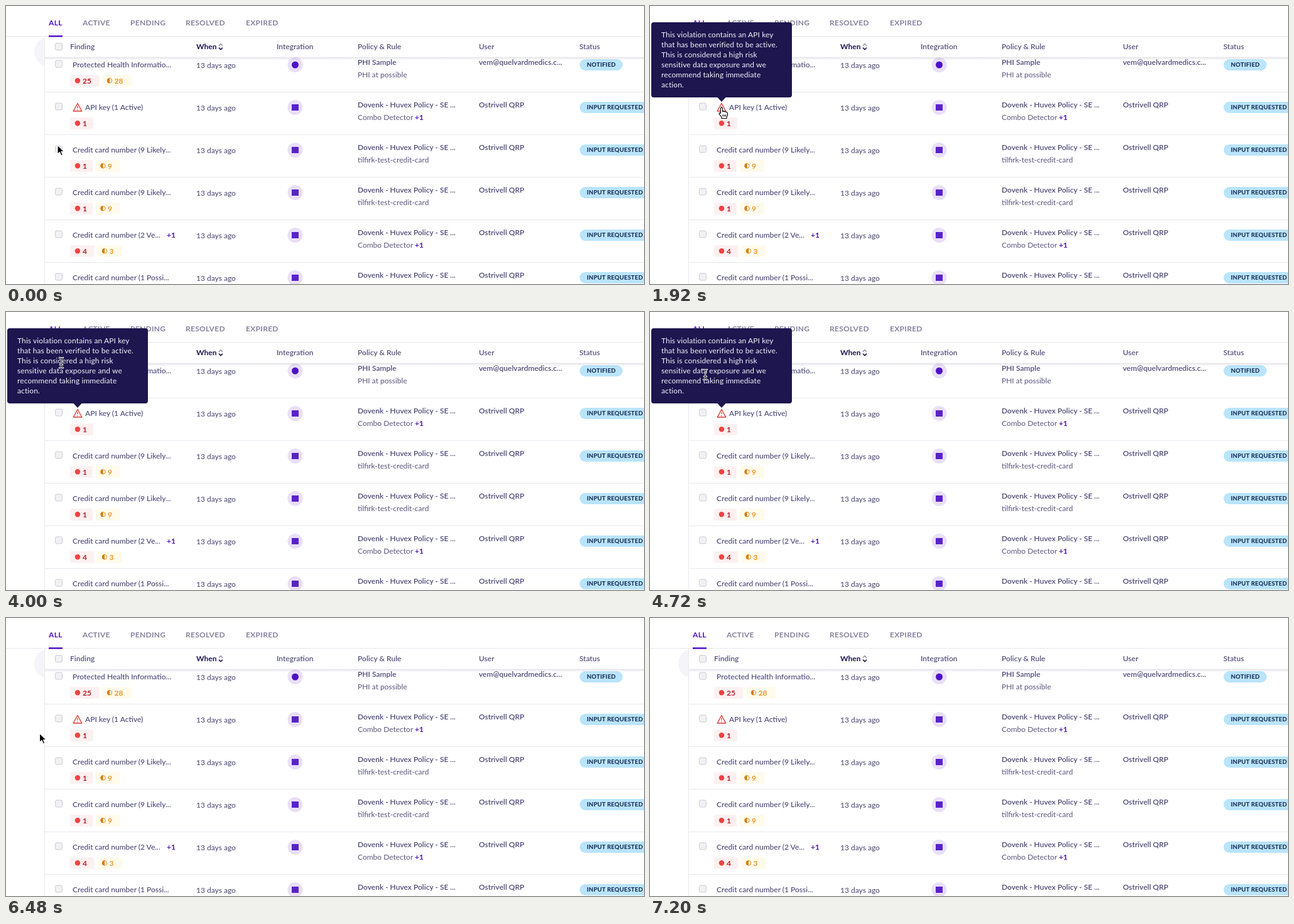
An HTML page for the animation above (7600 ms loop, 1016 by 444 pixels).

```html
<!DOCTYPE html>
<html lang="en">
<head>
<meta charset="utf-8">
<title>Findings table</title>
<style>
  html, body { margin: 0; height: 100%; overflow: hidden; background: #fff; }
  svg { display: block; width: 100%; height: 100%; }
  text { font: 500 12px Lato, "Open Sans", sans-serif; fill: #4b4776; white-space: pre; }
  .tab { font-weight: 700; letter-spacing: .3px; fill: #85829e; }
  .tab.on { fill: #5013c9; }
  .head { font-weight: 600; fill: #56527d; }
  .head.sorted { font-weight: 700; fill: #1c1650; }
  .when { fill: #55517c; }
  .bold { font-weight: 600; fill: #4e4a77; }
  .rule { font-weight: 400; fill: #5b577f; }
  .more { font-weight: 700; fill: #4c16b4; }
  .high { font-weight: 700; fill: #b8202b; }
  .mid { font-weight: 700; fill: #f0982a; }
  .status { font-size: 9.5px; font-weight: 800; letter-spacing: .2px; fill: #1c3158; }
  .tip { font-weight: 400; letter-spacing: .1px; fill: #f3f2f8; }
  .line { stroke: #e9e8ef; }
  .box { fill: #f1f1f4; stroke: #cbcad4; }
</style>
</head>
<body>
<svg id="stage" viewBox="0 0 1016 444">
  <defs>
    <linearGradient id="shade" x2="0" y2="1">
      <stop stop-color="#29264d" stop-opacity=".13"/>
      <stop offset="1" stop-color="#29264d" stop-opacity="0"/>
    </linearGradient>
  </defs>
  <g id="table"></g>
  <g id="tooltip"></g>
  <g id="cursor">
    <path id="arrow" d="M0 0V14.6L3.4 11.5 5.9 17 8.4 15.9 6 10.5H10.6Z"
      fill="#000" stroke="#fff" stroke-width="1.2" stroke-linejoin="round"/>
    <path id="hand" d="M-1.5 1.2Q0-1 1.5 1.2V6.5Q3.2 5 4.3 6.9 6 5.7 7 7.6 9.2 6.8 9.5 9.2V12
      Q9 14 8 15.4V17.5H0V15.6L-4 10.2Q-4.3 7.6-1.5 9.2ZM2 11.5V14.5M4.2 11.5V14.5M6.4 11.5V14.5"
      fill="#fff" stroke="#000" stroke-width="1.1" stroke-linejoin="round"/>
    <g id="beam" fill="none" stroke-linecap="round"></g>
  </g>
</svg>
<script>
const $ = id => document.getElementById(id);
const text = (x, y, cls, str) => `<text x="${x}" y="${y}" class="${cls}">${str}</text>`;
const rect = (x, y, w, h, r, attrs) =>
  `<rect x="${x}" y="${y}" width="${w}" height="${h}" rx="${r}" ${attrs}/>`;
const circle = (x, y, r, attrs) => `<circle cx="${x}" cy="${y}" r="${r}" ${attrs}/>`;
const path = (d, attrs) => `<path d="${d}" ${attrs}/>`;
const checkbox = y => rect(78.5, y - 5.5, 11, 11, 2.5, 'class="box"');

const ROW_HEIGHT = 68;
const chat = { policy: "Dovenk - Huvex Policy - SE ...", user: "Ostrivell QRP", status: "INPUT REQUESTED" };
const combo = { ...chat, rule: "Combo Detector", more: true };
const card = { ...chat, name: "Credit card number (9 Likely...", rule: "tilfirk-test-credit-card", high: [1, 36], mid: [9, 38.5] };
const rows = [
  { name: "Protected Health Informatio...", policy: "PHI Sample", rule: "PHI at possible",
    user: "vem@quelvardmedics.c...", status: "NOTIFIED", high: [25, 46.5], mid: [28, 46], round: true },
  { ...combo, name: "API key (1 Active)", high: [1, 37], alert: true },
  card,
  card,
  { ...combo, name: "Credit card number (2 Ve...", extra: true, high: [4, 38.5], mid: [3, 39] },
  { ...chat, name: "Credit card number (1 Possi...", rule: "" },
];

function badges({ high, mid }, y) {
  if (!high) return "";
  let out = rect(102, y - 9, high[1], 18.5, 2, 'fill="#fdf0f0"')
    + circle(114, y, 4.2, 'fill="#ee4343"') + text(122, y + 4.3, "high", high[0]);
  if (mid) {
    const x = 102 + high[1] + 5;
    out += rect(x, y - 9, mid[1], 18.5, 2, 'fill="#fffaea"')
      + circle(x + 11.5, y, 3.7, 'fill="none" stroke="#e28a1c" stroke-width="1"')
      + path(`M${x + 11.5} ${y - 4}a4 4 0 0 0 0 8z`, 'fill="#d97b0c"')
      + text(x + 19, y + 4.3, "mid", mid[0]);
  }
  return out;
}

const alertIcon = y =>
  path(`M114 ${y - 6.5}L120.8 ${y + 6}H107.2Z`,
    'fill="#fff" stroke="#dc3f38" stroke-width="1.4" stroke-linejoin="round"')
  + path(`M114 ${y - 2}v3.6m0 1.7v1.3`, 'stroke="#dc3f38" stroke-width="1.3"');

function drawRow(row, i) {
  const y = 94 + ROW_HEIGHT * i;
  return checkbox(y - 1.5)
    + (row.alert ? alertIcon(y) : "")
    + text(row.alert ? 126 : 106, y + 4, "", row.name)
    + (row.extra ? text(256, y + 4, "more", "+1") : "")
    + badges(row, y + 25.3)
    + text(303, y + 5, "when", "13 days ago")
    + circle(460.5, y, 12, 'fill="#e9dff8"')
    + (row.round ? circle(460.5, y, 5.5, 'fill="#4d12c6"') : rect(455, y - 5, 11, 10, 0, 'fill="#5822c9"'))
    + text(560, y, "bold", row.policy)
    + text(560, y + 20, "rule", row.rule)
    + (row.more ? text(651, y + 20, "more", "+1") : "")
    + text(753, y, "bold", row.user)
    + rect(913.5, y - 9, row.round ? 68.5 : 113, 18, 9, 'fill="#b9e4fb"')
    + text(925, y + 3.4, "status", row.status)
    + path(`M62 ${y + 43.5}H1016`, 'class="line"');
}

function drawTable() {
  const tabs = [["ALL", 68], ["ACTIVE", 122], ["PENDING", 198], ["RESOLVED", 286], ["EXPIRED", 382]];
  const heads = [["Finding", 102], ["When", 303], ["Integration", 431], ["Policy &amp; Rule", 560], ["User", 753], ["Status", 913]];
  return path("M61 51A23 23 0 0 0 61 95Z", 'fill="#f5f4f9"')
    + rows.map(drawRow).join("")
    + rect(62, 49, 954, 33, 0, 'fill="#fff"')
    + rect(62, 81.5, 954, 5, 0, 'fill="url(#shade)"')
    + path("M0 48.5H1016M61.5 49V444", 'class="line"')
    + rect(68, 47, 22, 2.5, 0, 'fill="#5013c9"')
    + tabs.map(([s, x]) => text(x, 31.3, x === 68 ? "tab on" : "tab", s)).join("")
    + checkbox(65)
    + heads.map(([s, x]) => text(x, 69, x === 303 ? "head sorted" : "head", s)).join("")
    + path("M339 63.5l3-3 3 3", 'fill="none" stroke="#8c89a5" stroke-width="1.3"')
    + path("M339 66.5l3 3 3-3", 'fill="none" stroke="#1c1650" stroke-width="1.7"');
}

function drawTooltip() {
  const lines = ["This violation contains an API key", "that has been verified to be active.",
    "This is considered a high risk", "sensitive data exposure and we", "recommend taking immediate", "action."];
  return rect(2, 26, 224, 120, 4, 'fill="#1d164f"')
    + path("M107 145.5H121L114 153Z", 'fill="#1d164f"')
    + lines.map((s, i) => text(18, 50 + 16 * i, "tip", s)).join("");
}

function drawBeam() {
  const shape = "M-3-8Q0-8 0-5.5Q0-8 3-8M0-5.5V5.5M-3 8Q0 8 0 5.5Q0 8 3 8M-2 3H2";
  return path(shape, 'stroke="#fff" stroke-width="2.6"') + path(shape, 'stroke="#222"');
}

// Pointer hot spot: [ms, x, y]
const route = [
  [320, 82, 222], [1120, 123, 167], [1200, 120, 165], [1440, 114, 162], [1920, 114, 162],
  [2240, 98, 70], [2480, 86, 42], [2800, 160, 57], [3040, 68, 68], [3280, 143, 73],
  [3520, 165, 76], [3840, 50, 78], [4240, 158, 87], [4560, 52, 94], [4720, 88, 100],
  [5040, 148, 106], [5360, 105, 100], [5760, 60, 152], [5920, 60, 152], [6480, 53.5, 184], [7120, 48, 189],
];
const LOOP = 7600, STEP = 80;
const clamp = v => v < 0 ? 0 : v > 1 ? 1 : v;

function pointerAt(t) {
  const next = route.findIndex(p => p[0] > t);
  if (next === 0) return route[0].slice(1);
  if (next < 0) return route.at(-1).slice(1);
  const [t0, x0, y0] = route[next - 1], [t1, x1, y1] = route[next];
  const k = (t - t0) / (t1 - t0), e = k * k * (3 - 2 * k);
  return [x0 + (x1 - x0) * e, y0 + (y1 - y0) * e];
}

function render(now) {
  const t = Math.floor(now % LOOP / STEP) * STEP;
  const [x, y] = pointerAt(t);
  const kind = t < 1040 || t >= 5760 ? "arrow" : y > 146 ? "hand" : "beam";
  for (const id of ["arrow", "hand", "beam"]) $(id).style.display = id === kind ? "" : "none";
  $("cursor").setAttribute("transform", `translate(${x} ${y})`);
  $("cursor").style.display = t < 7200 ? "" : "none";
  $("tooltip").style.opacity = clamp((t - 1200) / 240) * clamp((6160 - t) / 240);
}

$("table").innerHTML = drawTable();
$("tooltip").innerHTML = drawTooltip();
$("beam").innerHTML = drawBeam();
const start = performance.now();
function tick() {
  render(performance.now() - start);
  requestAnimationFrame(tick);
}
tick();
</script>
</body>
</html>
```
